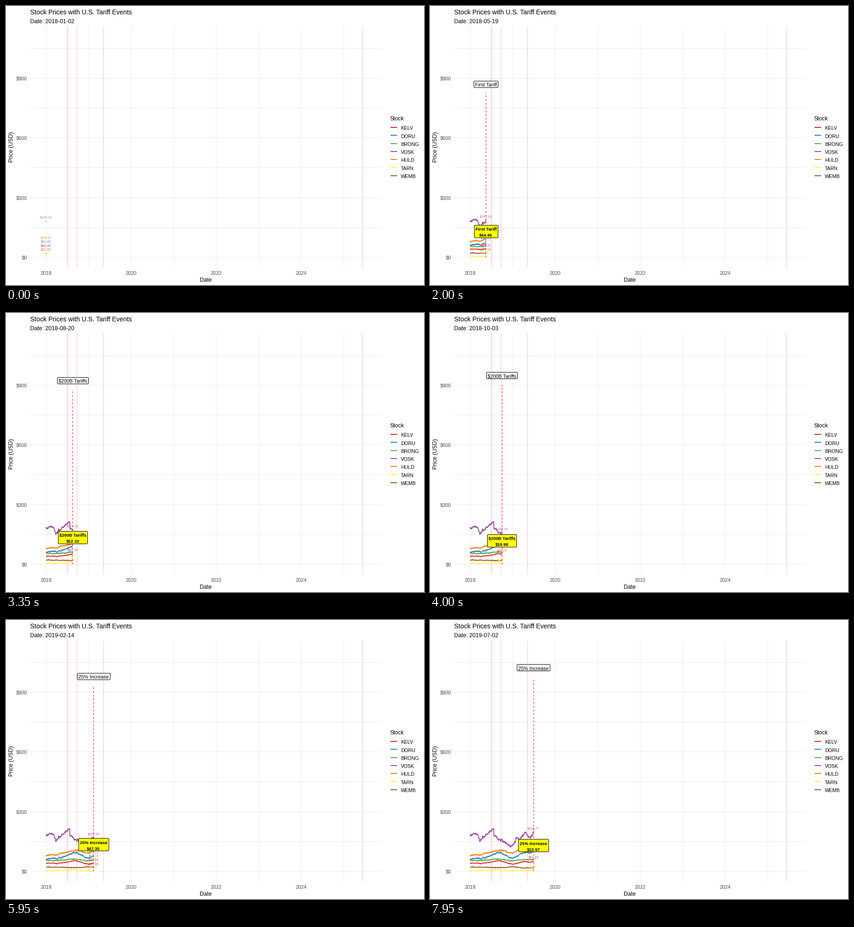
A matplotlib script for the animation above (8 s loop, 900 by 600 pixels).

```python
import numpy as np
import matplotlib.pyplot as plt
from matplotlib.animation import FuncAnimation
from matplotlib.colors import to_rgb
from matplotlib.patches import FancyBboxPatch

plt.rcParams["font.family"] = "Liberation Sans"
W, H, DPI = 900, 600, 100
PX = 72 / DPI                      # points per pixel
FRAMES, STEP = 160, 3.4342         # days revealed per frame
START = np.datetime64("2018-01-02")

# name, colour, first price, daily growth, autumn rally, winter slump, wobble
STOCKS = [("KELV", "#E41A1C", 40.4, 0.017, 9, 10, 0.4),
          ("DORU", "#377EB8", 61, 0.073, 16, 20, 1.2),
          ("BRONG", "#4DAF4A", 54.5, 0.012, 4, 7, 0.9),
          ("VOSK", "#984EA3", 183, 0, 0, 0, 2.4),
          ("HULD", "#FF7F00", 79.7, 0.085, 5, 18, 1.0),
          ("TARN", "#FFFF33", 4.9, -0.002, 2, 1.2, 0.05),
          ("WEMB", "#A65628", 21.2, -0.009, 0, -4, 0.5)]
COLORS = [s[1] for s in STOCKS]

# the one stock with sharp jumps follows key points (day, price)
SWINGS = [(0, 183), (30, 191), (69, 184), (84, 152), (140, 184), (203, 214),
          (205, 175), (274, 158), (328, 133), (357, 126), (391, 148),
          (394, 166), (430, 164), (480, 193), (517, 166), (548, 195)]

# day, caption, price on arrival, price on leaving
EVENTS = [(79, "$50B Tariff", 39.85, 20.61),
          (185, "First Tariff", 44.46, 20.59),
          (265, "$200B Tariffs", 52.32, 19.98),
          (493, "25% Increase", 47.35, 15.97),
          (607, "25% Increase", 50.17, 15.04)]


def X(day):
    return 86.3 + 0.25057 * np.asarray(day)


def Y(price):
    return 540.5 - 0.4278 * np.asarray(price)


def bump(d, centre, width):
    return np.exp(-((d - centre) / width) ** 2)


rng = np.random.default_rng(18)
days = np.array([d for d in range(552) if (d + 1) % 7 < 5])   # no weekends


def price_path(first, growth, rally, slump, wobble):
    slumps = bump(days, 365, 60) + 0.3 * (bump(days, 92, 15) + bump(days, 517, 18))
    path = first + growth * days + rally * bump(days, 245, 60) - slump * slumps
    if growth == 0:
        path = np.interp(days, *zip(*SWINGS))
    noise = np.zeros(len(days))
    for j in range(1, len(days)):
        noise[j] = 0.75 * noise[j - 1] + rng.normal(0, wobble)
    return path + noise


prices = [price_path(*s[2:]) for s in STOCKS]

fig = plt.figure(figsize=(W / DPI, H / DPI), dpi=DPI, facecolor="white")
ax = fig.add_axes([0, 0, 1, 1])
ax.set(xlim=(0, W), ylim=(H, 0))
ax.axis("off")


def text(x, y, s, px, color="black", ha="left", z=5, **kw):
    """Text whose capitals are centred on y."""
    return ax.text(x, y + 0.36 * px, s, fontsize=px * PX, color=color, ha=ha,
                   va="baseline", zorder=z, **kw)


def move(label, x, y):
    label.set_position((x, y + 0.36 * label.get_fontsize() / PX))


def line(xs, ys, color, px, z, **kw):
    return ax.plot(xs, ys, color=color, lw=px * PX, zorder=z, snap=False,
                   solid_capstyle="butt", dash_capstyle="butt", **kw)[0]


def box(fill, z):
    patch = FancyBboxPatch((0, 0), 1, 1, boxstyle="round,pad=0,rounding_size=2",
                           fc=fill, ec="black", lw=PX, zorder=z, snap=False)
    return ax.add_patch(patch)


# panel: a grid line every year and every 150 dollars
for k in range(8):
    x = round(float(X(365.25 * k - 1))) + 0.5
    y = np.floor(Y(150 * k)) + 0.5
    line([x, x], [44, 562], "#EBEBEB", 1, 1)
    line([52, 808], [y, y], "#EBEBEB", 1, 1)
    if k % 2 == 0:
        text(46, y + 1, f"${150 * k}", 10.8, "#4D4D4D", "right")
        if k < 8:
            text(x - 0.5, 574.5, str(2018 + k), 10.8, "#4D4D4D", "center")
for day, px in [(185, 3), (265, 2), (493, 2), (2721, 2)]:
    x = round(float(X(day)) - px / 2) + px / 2
    line([x, x], [44, 562], "#FF0000", px, 2, alpha=0.13)

# titles and legend
text(52, 13, "Stock Prices with U.S. Tariff Events", 14)
subtitle = text(52, 32.7, "", 12.3)
text(430, 589, "Date", 12.3, ha="center")
ax.text(12.5, 303.5, "Price (USD)", fontsize=12.2 * PX, rotation=90,
        ha="center", va="center")
text(826, 242, "Stock", 12.1)
for i, (name, color, *_) in enumerate(STOCKS):
    y = 261.05 + 17.28 * i
    line([828, 842], [round(y)] * 2, color, 2, 3)
    text(850, y + 1.4, name, 10.6)

# moving parts
curves = [line([], [], c, 1.8, 3) for c in COLORS]
tags = [text(0, 0, "", 7.3, c, "center", 6) for c in COLORS]
dots = line([86, 86], [461.5, 530.5], "black", 0, 4, marker="s", ms=1.3 * PX, mew=0)
dash = line([], [], "red", 1, 7, dashes=(4, 4))
flag, flag_text = box("white", 8), text(0, 0, "", 10.6, ha="center", z=9)
card = box("yellow", 10)
card_text = [text(0, 0, "", 9.3, ha="center", z=11, weight="bold") for _ in range(2)]
event_parts = [dash, flag, flag_text, card, *card_text]


def place(patch, label, x, y, h):
    """Centre a box on (x, y), as wide as its caption needs."""
    w = round(label.get_window_extent().width + 6.5)
    patch.set_bounds(round(x + 0.2 - w / 2) + 0.5, round(y - h / 2) + 0.5, w - 1, h - 1)


def draw_prices(n, day):
    mix = np.random.default_rng(n)
    past = days < day
    used = []
    for i, color in enumerate(COLORS):
        now = np.interp(day, days, prices[i])
        curves[i].set_data(X(np.append(days[past], day)),
                           Y(np.append(prices[i][past], now)))
        # a tag that would overlap an earlier one is skipped
        y = Y(now) - 8.6
        free = all(abs(y - u) > 6.1 for u in used)
        tags[i].set_visible(free)
        if free:
            used.append(y)
            tags[i].set_text(f"${now:.2f}")
            move(tags[i], X(day), y)
        share = mix.uniform(0, 0.3)
        other = np.array(to_rgb(COLORS[mix.integers(len(COLORS))]))
        tone = (1 - share) * np.array(to_rgb(color)) + share * other
        tags[i].set_color(0.85 * tone + 0.15)


def draw_event(day):
    shown = day >= EVENTS[0][0]
    for part in event_parts:
        part.set_visible(shown)
    if not shown:
        return
    k = max(i for i, e in enumerate(EVENTS) if e[0] <= day)
    (d0, cap0, _, leave), (d1, cap1, arrive, _) = EVENTS[k:k + 2]
    t = (day - d0) / (d1 - d0)
    height = 800 + 50 * (k + t)
    level = leave + t * (arrive - leave)
    cap, price = (cap0, leave) if t < 0.5 else (cap1, arrive)

    x = float(X(day))
    mid = np.floor(x) + 0.5
    dash.set_data([mid, mid], [540.5, Y(height)])

    y = float(Y(1.05 * height)) - 0.5
    flag_text.set_text(cap)
    move(flag_text, x - 0.3, y + 1)
    place(flag, flag_text, x, y, 15)

    y = float(Y(level + 100)) + 1.4
    for label, s, dy in zip(card_text, [cap, f"${price:.2f}"], [-5, 8]):
        label.set_text(s)
        move(label, x - 0.3, y + dy)
    place(card, card_text[0], x, y, 28)


def update(n):
    day = n * STEP
    subtitle.set_text(f"Date: {START + np.timedelta64(int(day), 'D')}")
    dots.set_visible(n == 0)
    draw_prices(n, day)
    draw_event(day)
    return []


anim = FuncAnimation(fig, update, frames=FRAMES, interval=50,
                     init_func=lambda: update(0), repeat=True, repeat_delay=0)
plt.show()
```
